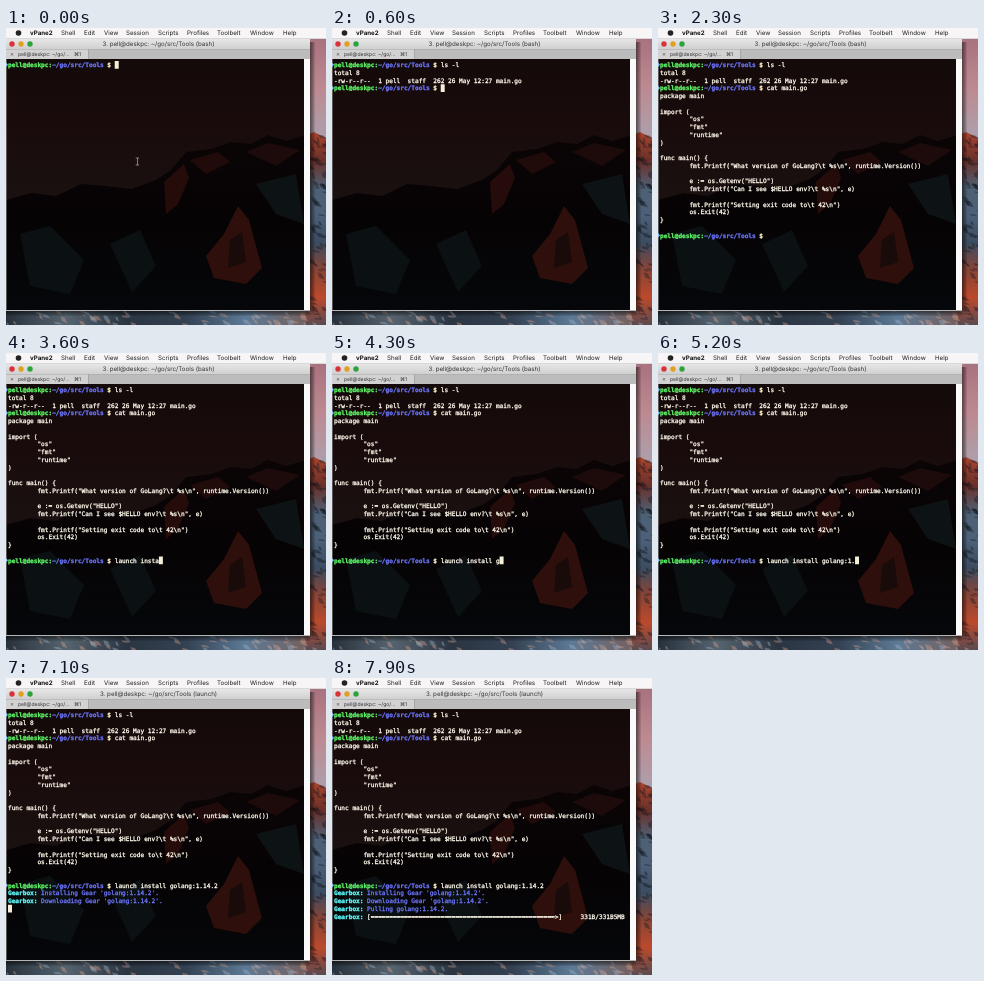
An HTML page with a canvas for the animation above (8000 ms loop, 320 by 297 pixels).

```html
<!DOCTYPE html>
<html lang="en">
<head>
<meta charset="utf-8">
<title>Terminal session</title>
<style>
  html, body { margin: 0; width: 100%; height: 100%; overflow: hidden; background: #15171c; }
  canvas { display: block; width: 320px; height: 297px; }
</style>
</head>
<body>
<canvas id="stage" width="320" height="297"></canvas>
<script>
const W = 320, H = 297, LOOP = 8000;
const CELL = 3.68, ROW = 7.75, LEFT = 2, TOP = 33;
const PANE = { right: 298, edge: 304, top: 31, bottom: 282 };
const MONO = '"DejaVu Sans Mono", monospace';
const SANS = 'Inter, sans-serif';
const USER = 'pell', HOST = 'deskpc', DIR = '~/go/src/Tools';
const COLORS = { text: '#fffaec', green: '#5ffa68', blue: '#6c76ff', cyan: '#60fdff', cream: '#fff6cc' };

const stage = document.getElementById('stage').getContext('2d');

function rect(c, x, y, w, h, fill) {
  c.fillStyle = fill;
  c.fillRect(x, y, w, h);
}

function disc(c, x, y, r, fill) {
  c.fillStyle = fill;
  c.beginPath();
  c.arc(x, y, r, 0, Math.PI * 2);
  c.fill();
}

function polygon(c, points, fill) {
  c.fillStyle = fill;
  c.beginPath();
  points.forEach(([x, y]) => c.lineTo(x, y));
  c.closePath();
  c.fill();
}

function label(c, text, x, y, size, fill = '#222', weight = 400, align = 'left') {
  c.font = `${weight} ${size}px ${SANS}`;
  c.textAlign = align;
  c.textBaseline = 'middle';
  c.textRendering = 'geometricPrecision';
  c.fillStyle = fill;
  c.fillText(text, x, y);
}

function gradient(c, [x0, y0, x1, y1], stops) {
  const g = c.createLinearGradient(x0, y0, x1, y1);
  stops.forEach((color, i) => g.addColorStop(i / (stops.length - 1), color));
  return g;
}

function seeded(seed) {
  return () => (seed = (seed * 16807) % 2147483647) / 2147483647;
}

const RIDGE = [[0, 172], [25, 165], [50, 168], [75, 156], [100, 158], [125, 161], [150, 152],
  [165, 142], [180, 124], [205, 121], [225, 114], [245, 116], [262, 107], [280, 113], [300, 107],
  [308, 104], [320, 110], [W, H], [0, H]];

// The part of the desktop that shows beside and below the window.
function drawDesktop(c) {
  rect(c, 0, 0, W, H, gradient(c, [0, 11, 0, 110], ['#a8727e', '#bd8a92', '#aca0ac']));
  polygon(c, RIDGE, gradient(c, [0, 105, 0, H],
    ['#a8442f', '#6a302a', '#4e6074', '#4c6078', '#3c4c60', '#8a4436', '#bb4a2c', '#5c4a50']));
  rect(c, 0, 282, 300, 15, gradient(c, [0, 0, 300, 0],
    ['#27313c', '#56646f', '#2b3542', '#334152', '#5d7a96', '#74605f']));
  const rnd = seeded(4711), shades = ['#0c1016', '#d6a08c', '#151b24', '#9fb2c6'];
  c.globalAlpha = 0.4;
  for (let i = 0; i < 110; i++) {
    const below = i % 2, x = below ? rnd() * W : 302 + rnd() * 18, y = below ? 281 + rnd() * 14 : 106 + rnd() * 185;
    const w = 3 + rnd() * 7, h = 2 + rnd() * 6;
    polygon(c, [[x, y], [x + w * 0.6, y + h * 0.2], [x + w, y + h], [x + w * 0.2, y + h * 0.7]], shades[i % 4]);
  }
  c.globalAlpha = 1;
}

// The same mountains, dimmed behind the terminal text.
function drawBackdrop(c) {
  rect(c, 0, PANE.top, PANE.right, PANE.bottom - PANE.top,
    gradient(c, [0, 31, 0, 160], ['#140a0a', '#190b0b', '#1a1010']));
  polygon(c, RIDGE, gradient(c, [0, 110, 0, 282], ['#0a0405', '#060304', '#05070a']));
  polygon(c, [[158, 154], [178, 136], [183, 150], [172, 176], [160, 186]], '#250c0a');
  polygon(c, [[184, 132], [212, 124], [224, 134], [200, 146]], '#200b0a');
  polygon(c, [[240, 124], [262, 115], [294, 122], [270, 138]], '#1c0b0a');
  polygon(c, [[232, 178], [243, 192], [256, 240], [240, 256], [208, 250], [200, 228], [218, 206]], '#2e0f0b');
  polygon(c, [[224, 212], [236, 204], [240, 234], [222, 240]], '#1a0b0b');
  polygon(c, [[14, 206], [44, 198], [78, 232], [64, 266], [24, 258]], '#0b1013');
  polygon(c, [[104, 216], [134, 202], [150, 238], [126, 264]], '#0b1013');
  polygon(c, [[250, 156], [290, 146], [298, 196], [270, 186]], '#0d1215');
}

function drawWindow(c) {
  const { right, edge, top, bottom } = PANE;
  for (let i = 1; i <= 5; i++) {
    rect(c, edge, 14, i, bottom - 14 + i, 'rgba(0,0,0,.12)');
    rect(c, 0, bottom, edge, 1 + i, 'rgba(0,0,0,.12)');
  }
  c.save();
  c.beginPath();
  c.rect(0, top, right, bottom - top);
  c.clip();
  drawBackdrop(c);
  c.restore();

  rect(c, 0, 11, edge, 10, gradient(c, [0, 11, 0, 21], ['#e6e6e6', '#d0d0d0']));
  ['#d9323a', '#dfa024', '#2aa53c'].forEach((color, i) => disc(c, 6 + i * 9, 16, 2.7, color));
  rect(c, 0, 21, edge, 10, '#bcbcbc');
  rect(c, 0, 21, 82, 10, '#d2d2d2');
  rect(c, 0, 21, edge, 0.5, '#a5a5a5');
  rect(c, 82, 21, 0.6, 10, '#999');
  label(c, '×', 4, 26, 6, '#555');
  label(c, `${USER}@${HOST}: ~/go/...`, 12, 26.3, 5.1, '#333');
  label(c, '⌘1', 68, 26.3, 5.1, '#333');
  rect(c, right, top, edge - right, bottom - top, '#fafafa');
  rect(c, 0, top, 0.6, bottom - top, '#8c8c8c');
  rect(c, 0, bottom, edge, 1, '#b5b5b5');
}

function drawMenuBar(c) {
  rect(c, 0, 0, W, 11, '#f7f5f6');
  rect(c, 0, 10.5, W, 0.5, '#bdbdbd');
  disc(c, 12.5, 5, 2.8, '#222');
  label(c, 'vPane2', 24, 5.5, 6.2, '#111', 700);
  const menu = { Shell: 55, Edit: 78, View: 98, Session: 120, Scripts: 152, Profiles: 181,
    Toolbelt: 211, Window: 244, Help: 277 };
  for (const name in menu) label(c, name, menu[name], 5.5, 6.2, '#1c1c1c');
}

const scenery = document.createElement('canvas');
scenery.width = W;
scenery.height = H;
[drawDesktop, drawWindow, drawMenuBar].forEach(paint => paint(scenery.getContext('2d')));

function print(row, col, text, color = 'text', bold = false) {
  stage.font = `${bold ? 'bold ' : ''}${CELL / 0.602}px ${MONO}`;
  stage.textAlign = 'left';
  stage.textBaseline = 'alphabetic';
  stage.textRendering = 'geometricPrecision';
  stage.fillStyle = stage.strokeStyle = COLORS[color];
  stage.lineWidth = 0.3;
  [...text].forEach((ch, i) => {
    if (ch === ' ') return;
    const x = LEFT + (col + i) * CELL, y = TOP + row * ROW + 6;
    stage.fillText(ch, x, y);
    stage.strokeText(ch, x, y);
  });
}

const HOME = `${USER}@${HOST}:`;
const PROMPT = HOME.length + DIR.length + 3;

function prompt(row, command = '') {
  const y = TOP + row * ROW;
  polygon(stage, [[0, y + 1.5], [2, y + 3.8], [0, y + 6]], '#8fc4ff');
  print(row, 0, HOME, 'green', true);
  print(row, HOME.length, DIR, 'blue', true);
  print(row, PROMPT - 2, '$', 'cream', true);
  print(row, PROMPT, command);
}

function gearbox(row, text, color = 'blue') {
  print(row, 0, 'Gearbox:', 'cyan', true);
  print(row, 9, text, color);
}

function cursor(row, col) {
  rect(stage, LEFT + col * CELL, TOP + row * ROW, CELL + 0.3, ROW, '#f5eed8');
}

function keyed(keys, t) {
  if (t <= keys[0][0]) return keys[0][1];
  for (let i = 1; i < keys.length; i++) {
    const [t0, v0] = keys[i - 1], [t1, v1] = keys[i];
    if (t < t1) return v0 + (v1 - v0) * (t - t0) / (t1 - t0);
  }
  return keys[keys.length - 1][1];
}

const COMMANDS = [
  { row: 0, from: 0, enter: 550, text: 'ls -l', keys: [[100, 0], [500, 5]] },
  { row: 3, from: 550, enter: 1800, text: 'cat main.go', keys: [[850, 0], [1700, 11]] },
  { row: 22, from: 1800, enter: 6000, text: 'launch install golang:1.14.2',
    keys: [[2700, 0], [3600, 12], [4000, 15], [4200, 15], [4700, 22], [5000, 22], [5200, 24], [5600, 28]] }
];

const LISTING = ['total 8', `-rw-r--r--  1 ${USER}  staff  262 26 May 12:27 main.go`];
const PROGRAM = String.raw`package main

import (
        "os"
        "fmt"
        "runtime"
)

func main() {
        fmt.Printf("What version of GoLang?\t %s\n", runtime.Version())

        e := os.Getenv("HELLO")
        fmt.Printf("Can I see $HELLO env?\t %s\n", e)

        fmt.Printf("Setting exit code to\t 42\n")
        os.Exit(42)
}`.split('\n');

function progressBar(t) {
  const part = Math.min(1, (t - 7400) / 400), filled = Math.floor(part * 50);
  const bar = '='.repeat(filled) + '>' + ' '.repeat(50 - filled);
  const done = part === 1 ? '331B' : (part * 50.35).toFixed(2) + 'MB';
  return `[${bar}] ${done.padStart(8)}/${part === 1 ? '331B5MB' : '50.35MB'}`;
}

function drawInstall(t) {
  const steps = [[6250, "Installing Gear 'golang:1.14.2'."], [6500, "Downloading Gear 'golang:1.14.2'."],
    [7200, 'Pulling golang:1.14.2.']].filter(([at]) => t >= at);
  steps.forEach(([, text], i) => gearbox(23 + i, text));
  if (t >= 7400) gearbox(26, progressBar(t), 'text');
  else if (t < 6700 || t >= 6900) cursor(23 + steps.length, 0);
}

function draw(t) {
  stage.drawImage(scenery, 0, 0);
  const job = t < 6000 ? 'bash' : 'launch';
  label(stage, `3. ${USER}@${HOST}: ${DIR} (${job})`, 152.5, 16.4, 6.2, '#333', 400, 'center');

  for (const { row, from, enter, text, keys } of COMMANDS) {
    if (t < from) break;
    const typed = Math.floor(keyed(keys, t) + 1e-6);
    prompt(row, text.slice(0, typed));
    const blinkedOff = t >= 2200 && t < 2700;
    if (t < enter && !blinkedOff) cursor(row, PROMPT + typed);
  }
  if (t >= 550) LISTING.forEach((line, i) => print(1 + i, 0, line));
  if (t >= 1800) PROGRAM.forEach((line, i) => print(4 + i, 0, line));
  if (t >= 6000) drawInstall(t);

  if (t < 100) {
    rect(stage, 131, 130, 0.8, 7, '#999');
    rect(stage, 129.7, 129.6, 3.4, 0.8, '#999');
    rect(stage, 129.7, 136.6, 3.4, 0.8, '#999');
  }
}

const start = performance.now();
function tick() {
  draw((performance.now() - start) % LOOP);
  requestAnimationFrame(tick);
}
tick();
</script>
</body>
</html>
```
